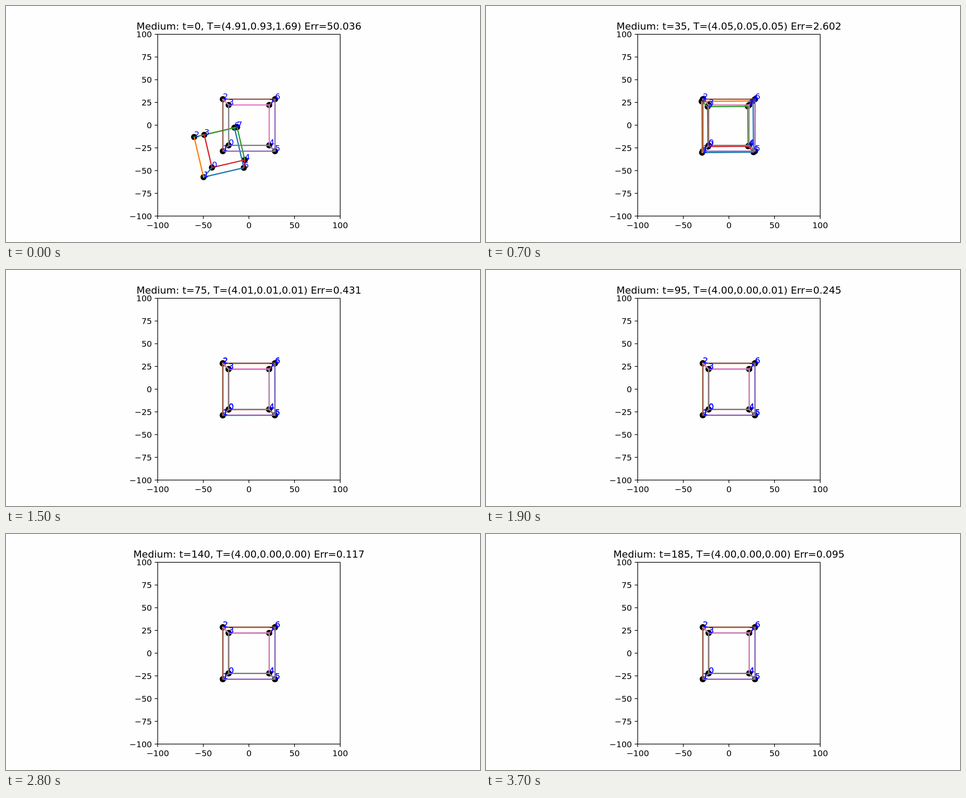
These frames come from a looping animation (1058x529 px, 3.8 s). An HTML page with a canvas:

```html
<!DOCTYPE html>
<html lang="en">
<head>
<meta charset="utf-8">
<title>Pose convergence</title>
<style>
html, body { margin: 0; width: 100%; height: 100%; overflow: hidden; background: #fefefe; }
canvas { display: block; }
</style>
</head>
<body>
<canvas id="stage" width="1058" height="529"></canvas>
<script>
const ctx = document.getElementById("stage").getContext("2d");
const PT = 132.25 / 72;               // pixels per point
const BOX = { l: 338.6, r: 745.9, t: 63.5, b: 470.8 };
const CX = (BOX.l + BOX.r) / 2, CY = (BOX.t + BOX.b) / 2;
const UNIT = (BOX.r - BOX.l) / 200;   // pixels per data unit
const FOCAL = 100 * UNIT;
const FONT = '"DejaVu Sans", sans-serif';
const FRAME = 100, FRAMES = 38, STEP = 5;
const COLORS = ["#1f77b4", "#ff7f0e", "#2ca02c", "#d62728",
                "#9467bd", "#8c564b", "#e377c2", "#7f7f7f"];

// cube corners: x, y, depth offset
const CORNERS = [];
for (const x of [-1, 1])
  CORNERS.push([x, -1, .5], [x, -1, -.5], [x, 1, -.5], [x, 1, .5]);

// offsets from the goal pose, decaying over the iterations
const KNOTS = [0, 15, 35, 55, 95, 140, 185];
const DECAY = {
  err:  [50.036, 11.251, 2.602, .908, .245, .117, .095],
  z:    [.912, .201, .05, .02, .004, .002, .0015],
  x:    [1.448, .277, .052, .0142, .0035, .0015, .0012],
  y:    [1.322, .272, .062, .02, .0055, .002, .0015],
  turn: [13.15, 2.85, .5, .12, .03, .01, .008],
  ty:   [.93, .22, .05, .02, .004, .002, .001],
  tz:   [1.69, .25, .05, .02, .006, .003, .002]
};

// cubic Hermite through the logarithms
function decay(name, t) {
  const v = DECAY[name].map(Math.log), last = KNOTS.length - 2;
  const rate = i => (v[i + 1] - v[i]) / (KNOTS[i + 1] - KNOTS[i]);
  const slope = i => i === 0 ? 1.5 * rate(0) - .5 * rate(1)
    : i > last ? rate(last) : (rate(i - 1) + rate(i)) / 2;
  let i = 0;
  while (i < last && t >= KNOTS[i + 1]) i++;
  const h = KNOTS[i + 1] - KNOTS[i], u = (t - KNOTS[i]) / h, w = 1 - u;
  return Math.exp(w * w * (1 + 2 * u) * v[i] + u * u * (3 - 2 * u) * v[i + 1]
    + h * u * w * (w * slope(i) - u * slope(i + 1)));
}

function project(dx, dy, depth, deg) {
  const c = Math.cos(deg * Math.PI / 180), s = Math.sin(deg * Math.PI / 180);
  return CORNERS.map(([x, y, z]) => {
    const k = FOCAL / (depth + z);
    return [CX + (c * x - s * y + dx) * k, CY - (s * x + c * y + dy) * k];
  });
}

function label(str, x, y, size, align, color = "#000") {
  ctx.font = size * PT + "px " + FONT;
  ctx.textAlign = align;
  ctx.fillStyle = color;
  ctx.fillText(str, x, y);
}

function path(points, color, width) {
  ctx.beginPath();
  points.forEach(p => ctx.lineTo(p[0], p[1]));
  ctx.strokeStyle = color;
  ctx.lineWidth = width * PT;
  ctx.stroke();
}

function dots(points) {
  ctx.fillStyle = "#000";
  for (const [x, y] of points) {
    ctx.beginPath();
    ctx.arc(x, y, 3.75 * PT, 0, 2 * Math.PI);
    ctx.fill();
  }
}

function wires(p, first) {
  for (let i = 0; i < 4; i++) {
    const a = (i + 1) % 4, b = (i + 2) % 4;
    path([p[i], p[a], p[4 + a], p[4 + b]], COLORS[first + i], 1.5);
  }
}

function axes() {
  const tick = 3.5 * PT, name = n => String(n).replace("-", "\u2212");
  ctx.lineCap = "butt";
  for (let n = -100; n <= 100; n += 25) {
    const y = CY - n * UNIT;
    path([[BOX.l - tick, y], [BOX.l, y]], "#000", .8);
    label(name(n), BOX.l - 2 * tick, y + 6.7, 10, "right");
    if (n % 50) continue;
    const x = CX + n * UNIT;
    path([[x, BOX.b], [x, BOX.b + tick]], "#000", .8);
    label(name(n), x, 497.8, 10, "center");
  }
  ctx.strokeRect(BOX.l, BOX.t, BOX.r - BOX.l, BOX.b - BOX.t);
}

const goal = project(0, 0, 4, 0);

function draw(t) {
  const at = name => decay(name, t), depth = 4 + at("z");
  const cube = project(-at("x"), -at("y"), depth, at("turn"));
  ctx.fillStyle = "#fefefe";
  ctx.fillRect(0, 0, 1058, 529);
  dots(cube);
  dots(goal);
  ctx.lineCap = "square";
  ctx.lineJoin = "round";
  wires(cube, 0);
  wires(goal, 4);
  ctx.lineJoin = "miter";
  axes();
  for (const set of [cube, goal])
    set.forEach(([x, y], i) => label(i, x, y, 10, "left", "#00f"));
  const T = [depth, at("ty"), at("tz")].map(n => n.toFixed(2));
  label(`Medium: t=${t}, T=(${T}) Err=${at("err").toFixed(3)}`, CX, 52.5, 12, "center");
}

function loop() {
  draw(Math.floor(performance.now() / FRAME) % FRAMES * STEP);
  requestAnimationFrame(loop);
}
loop();
</script>
</body>
</html>
```
